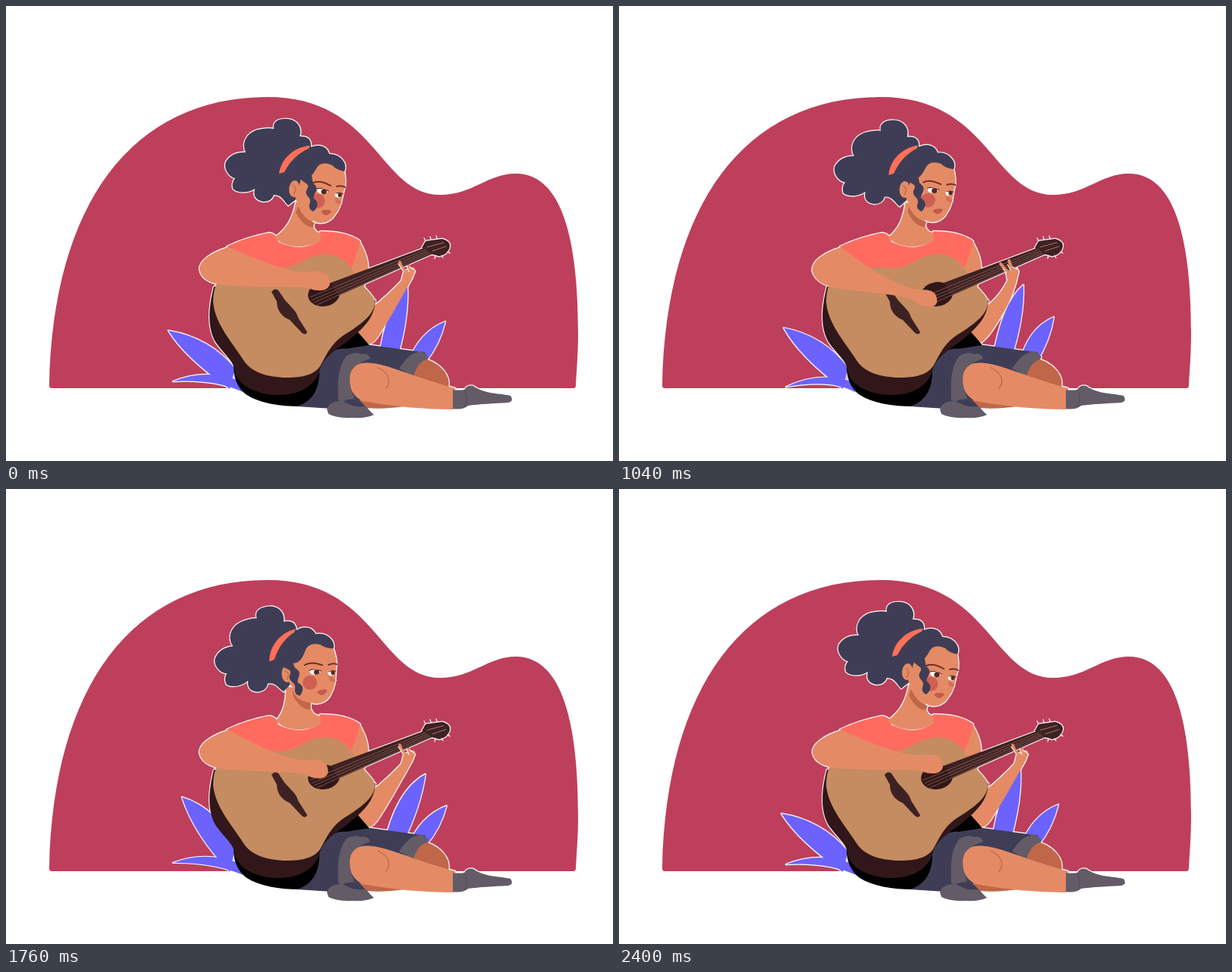
An HTML page with a canvas for the animation above (2440 ms loop, 800 by 600 pixels).

```html
<!DOCTYPE html>
<html lang="en">
<head>
<meta charset="utf-8">
<title>Guitar player</title>
<style>
html, body { margin: 0; width: 100%; height: 100%; overflow: hidden; background: #fff; }
canvas { display: block; }
</style>
</head>
<body>
<canvas id="stage" width="800" height="600"></canvas>
<script>
const ctx = document.getElementById('stage').getContext('2d');
const LOOP = 2440, STEP = 80, CYCLE = 1200;
const C = {
  wall: '#be3f5b', leaf: '#6c63ff', skin: '#e48b65', skinDark: '#c0674a', hair: '#3f3d56',
  coral: '#ff6c5f', band: '#ff7058', tan: '#c58c61', side: '#311719', wood: '#3e2123',
  cuff: '#635c66', brow: '#722f2b', blush: '#cf5f55', lips: '#c35a4c'
};

// [time, value] keys, eased between neighbours
const HEAD = [[0, 0], [400, .76], [560, 1], [800, .98], [1200, 0], [1520, 1.02], [2000, .98], [2400, 0]];
const STRUM = [[0, 0], [80, 0], [320, 1], [400, 1], [720, 0], [800, 0], [1200, .8], [1360, 1], [1520, 1], [1840, 0], [2400, 0]];
const CHORD = [[0, 0], [160, 0], [240, 1], [1200, 1], [1440, 0], [2400, 0]];

function sample(keys, t) {
  const i = keys.findIndex(k => k[0] >= t);
  if (i < 1) return keys[i < 0 ? keys.length - 1 : 0][1];
  const [t0, a] = keys[i - 1], [t1, b] = keys[i];
  const u = (t - t0) / (t1 - t0);
  return a + (b - a) * u * u * (3 - 2 * u);
}

// Blend two path strings that share the same commands
function blend(from, to, k) {
  const ends = to.match(/-?[\d.]+/g);
  let i = 0;
  return from.replace(/-?[\d.]+/g, n => +n + (ends[i++] - n) * k);
}

let halo = false;

function fill(color, d) {
  const path = new Path2D(d);
  if (halo) return ctx.stroke(path);
  ctx.fillStyle = color;
  ctx.fill(path);
}

function line(color, width, d) {
  if (halo) return;
  ctx.strokeStyle = color;
  ctx.lineWidth = width;
  ctx.stroke(new Path2D(d));
}

function oval(color, x, y, rx, ry = rx, turn = 0) {
  if (halo) return;
  ctx.fillStyle = color;
  ctx.beginPath();
  ctx.ellipse(x, y, rx, ry, turn, 0, Math.PI * 2);
  ctx.fill();
}

function wall() {
  fill(C.wall, 'M60 504 Q57 504 57 500 C62 262 165 120 345 120 C488 120 492 249 572 249 ' +
    'C615 249 635 221 672 221 C740 221 754 330 754 430 C754 460 752 480 751 500 Q751 504 748 504 Z');
}

function plants(t) {
  const phase = t / CYCLE * Math.PI * 2;
  const slow = 1 - Math.cos(phase), sway = Math.sin(phase);
  fill(C.leaf, blend('M302 478 Q268 437 214 428 Q236 464 295 505 Z',
    'M302 476 Q274 429 223 417 Q242 460 295 505 Z', slow));
  fill(C.leaf, blend('M305 493 Q262 478 220 495 Q275 492 312 509 Z',
    'M305 491 Q262 473 220 485 Q268 493 312 508 Z', sway));
  fill(C.leaf, blend('M490 470 Q502 391 529 366 Q532 412 514 470 Z',
    'M494 470 Q508 394 541 371 Q540 414 518 470 Z', slow));
  fill(C.leaf, blend('M530 470 Q544 430 579 416 Q572 446 553 470 Z',
    'M532 470 Q552 436 587 424 Q577 452 557 470 Z', sway));
}

function legs() {
  fill('#000', 'M300 476 C300 492 306 504 316 512 C334 524 360 528 388 528 C412 522 414 500 415 485 L440 455 L481 450 L462 426 Z');
  fill(C.skinDark, 'M515 490 L540 468 L555 466 C572 472 587 486 583 504 L540 512 Z');
  fill(C.skinDark, 'M455 520 L490 505 L530 527 Q490 534 462 528 Z');
  fill(C.hair, 'M413 482 C416 462 432 450 448 452 L480 447 L553 457 L535 488 L475 510 L462 526 L430 531 L383 528 C404 522 413 505 413 482 Z');
  fill(C.cuff, 'M518 478 C526 467 532 459 541 457 Q548 453 551 458 Q559 461 555 466 C548 468 541 474 537 488 Z');
  fill(C.skin, 'M455 480 C462 467 482 469 505 476 C535 486 565 497 592 504 L590 532 C550 532 510 528 470 521 C452 512 450 494 455 480 Z');
  fill(C.cuff, 'M438 520 C437 496 437 476 449 461 Q460 455 468 459 Q477 457 480 465 C462 471 453 478 453 491 Q453 505 459 516 Q450 525 438 520 Z');
  line(C.skinDark, 1.3, 'M490 477 C503 483 509 494 501 504');
  fill(C.cuff, 'M589 506 Q597 507 604 506 Q608 499 616 501 C630 512 655 511 665 514 Q670 521 662 523 C643 524 624 525 609 527 Q602 533 589 531 Z');
  line('#514c59', 1, 'M604 507 Q610 516 605 528');
  fill(C.cuff, 'M423 532 Q426 521 442 521 Q458 514 470 524 C477 530 481 536 485 539 Q475 544 457 543 Q436 544 425 538 Z');
  fill(C.hair, 'M444 521 Q458 515 469 523 L473 528 Q458 530 444 521 Z');
}

function torso(chord) {
  fill(C.skin, 'M455 315 L467 312 C475 326 479 338 477 356 L470 375 L445 350 Z');
  fill(C.skin, blend(
    'M462 428 L478 446 C484 445 489 439 493 432 C505 414 515 395 526 376 L535 360 L539 350 L537 346 L530 347 L524 350 L521 362 C510 374 498 385 480 400 Z',
    'M462 428 L477 444 C483 440 488 434 492 428 C503 412 515 392 519 378 L523 366 L527 350 L524 345 L516 346 L510 352 L512 362 C503 378 498 385 480 400 Z', chord));
  fill(C.coral, 'M291 317 C308 309 326 303 347 299 Q357 300 359 311 Q388 325 411 311 L414 297 C435 297 454 300 467 310 C464 323 461 333 455 345 L430 360 L330 355 C320 347 306 336 291 317 Z');
}

function neck(tilt) {
  fill(C.skin, blend('M382 258 C378 280 370 294 354 305 C366 320 398 321 415 309 L414 299 Q405 298 404 284 L410 270 Z',
    'M369 260 C369 280 366 294 356 305 C366 320 398 321 415 309 L414 299 Q401 298 401 282 L405 268 Z', tilt));
  fill(C.skinDark, blend('M385 264 C390 275 396 282 407 286 L404 292 C392 290 386 280 382 272 Z',
    'M377 263 C380 274 386 280 402 282 L401 291 C391 291 383 282 378 272 Z', tilt));
}

function head(tilt) {
  ctx.save();
  ctx.translate(404 - 2 * tilt, 290 - 1.5 * tilt);
  ctx.rotate(-.165 * tilt);
  ctx.translate(-404, -290);
  fill(C.hair, 'M372 263 C366 258 364 249 353 249 Q350 258 339 258 Q324 255 328 241 C319 247 305 247 299 241 Q297 233 302 227 ' +
    'C294 226 286 214 290 205 Q298 192 316 193 C310 181 317 167 332 163 Q345 160 353 162 C351 152 360 148 371 149 C384 150 391 161 387 172 Q402 171 402 184 L400 235 L381 256 Z');
  fill(C.skin, 'M381 235 L400 200 L442 205 Q449 222 447 239 C443 247 444 263 434 275 C427 287 412 290 402 281 C393 275 385 265 381 252 Z');
  fill(C.hair, 'M361 222 C366 202 382 187 400 187 C411 181 423 184 426 195 Q439 195 445 205 Q449 211 446 218 Q435 216 430 210 Q414 203 408 216 C403 225 397 230 389 228 L382 250 L372 263 Q362 248 361 222 Z');
  fill(C.band, 'M360 221 C362 204 377 186 401 184 L399 188 C387 193 375 203 367 219 Z');
  oval(C.skin, 380, 241, 7, 11, .1);
  line(C.skinDark, 1.2, 'M378 236 Q385 240 379 248');
  oval(C.blush, 411 - 3 * tilt, 257, 9.5);
  line(C.brow, 2, 'M405 233 Q414 229 428 237 M436 238 Q442 236 447 239');
  oval('#fff', 417, 244, 7, 4, .15);
  oval('#fff', 438, 249, 4.5, 3.5, .1);
  oval('#542823', 419, 245, 3.7, 3.2);
  oval('#542823', 440, 249, 2.6, 3);
  line(C.brow, 1.2, 'M410 241 Q416 239 425 244 M435 247 Q439 245 444 248');
  fill('#d2705a', 'M434 253 Q439 254 442 260 Q437 263 434 258 Z');
  fill(C.lips, 'M415 271 Q419 268 423 269 Q426 268 429 271 Q425 276 421 276 Q418 275 415 271 Z');
  ctx.translate(-13 * tilt, tilt);
  fill(C.hair, 'M387 224 C390 235 402 233 397 241 C391 251 405 252 400 261 Q398 268 405 271 C411 266 413 259 406 254 C403 249 415 242 406 235 C402 231 406 224 399 219 Z');
  ctx.restore();
}

function guitar() {
  fill(C.side, 'M274 370 C266 400 266 425 276 443 C288 460 300 468 301 480 C304 500 330 513 360 513 C390 513 408 498 413 482 C418 460 440 452 462 432 C478 418 486 405 487 388 Z');
  fill(C.tan, 'M278 365 C300 345 320 345 345 345 C378 349 386 337 402 331 C424 322 445 329 458 350 C464 366 482 377 486 388 C488 405 469 419 450 431 C427 444 421 464 414 475 C403 490 382 490 365 490 C339 488 325 482 315 470 C301 447 275 420 273 390 Q273 376 278 365 Z');
  oval(C.side, 419, 380, 21, 16, -.15);
  fill(C.wood, 'M350 377 Q354 371 359 375 L367 387 L378 399 Q383 404 385 411 L397 430 Q395 435 390 431 L374 414 C364 410 357 402 357 390 Z');
  fill(C.wood, 'M428 365 L551 319 L562 327 L438 382 Z');
  fill(C.wood, 'M548 319 L553 310 L575 307 Q585 310 585 316 Q584 327 571 330 L560 327 Z');
  line('#8b6254', .8, 'M401 384 L553 321 M403 388 L555 323 M406 391 L557 324.5 M410 394 L559 326');
  line('#a67866', 1, 'M555 318 L577 312 M562 323 L580 317');
  line('#fff', 1.2, 'M553 310 l-2 -4 M560 308 l-1 -4 M568 307 l-1 -4 M566 329 l-1 4 M574 329 l2 3 M582 324 l3 2');
}

function fingers(chord) {
  line(C.skin, 4, blend('M519 338 Q521 345 528 353 M531 343 L532 354 M537 347 L531 361',
    'M503 340 Q508 347 516 354 M514 336 L519 351 M523 347 L518 358', chord));
  line('#fff', 1.1, blend('M524 350 L517 340 M531 350 L528 343 M538 348 L532 344',
    'M510 352 L506 346 M516 348 L512 341 M525 347 L518 344', chord));
}

function strummingArm(down) {
  fill(C.skin, blend(
    'M293 318 C270 325 254 336 255 348 C258 362 272 368 300 369 C340 371 370 370 392 371 C400 371 403 375 411 375 C420 376 426 372 427 366 C426 352 418 350 405 350 C392 352 380 350 370 347 C345 341 320 329 293 318 Z',
    'M293 318 C270 325 254 336 254 350 C258 366 275 375 300 379 C330 384 352 390 368 397 C377 402 382 412 394 415 C403 419 412 419 412 411 C413 402 407 398 401 397 C393 395 384 393 375 387 C344 370 318 349 293 318 Z', down));
}

function player(t) {
  const tilt = sample(HEAD, t), chord = sample(CHORD, t);
  plants(t);
  legs();
  torso(chord);
  neck(tilt);
  head(tilt);
  guitar();
  fingers(chord);
  strummingArm(sample(STRUM, t));
}

function draw(t) {
  ctx.clearRect(0, 0, 800, 600);
  ctx.lineCap = ctx.lineJoin = 'round';
  wall();
  halo = true;
  ctx.strokeStyle = '#fff';
  ctx.lineWidth = 2.4;
  player(t);
  halo = false;
  player(t);
}

const start = performance.now();
function tick() {
  const t = (performance.now() - start) % LOOP;
  draw(Math.floor(t / STEP) * STEP);
  requestAnimationFrame(tick);
}
tick();
</script>
</body>
</html>
```
